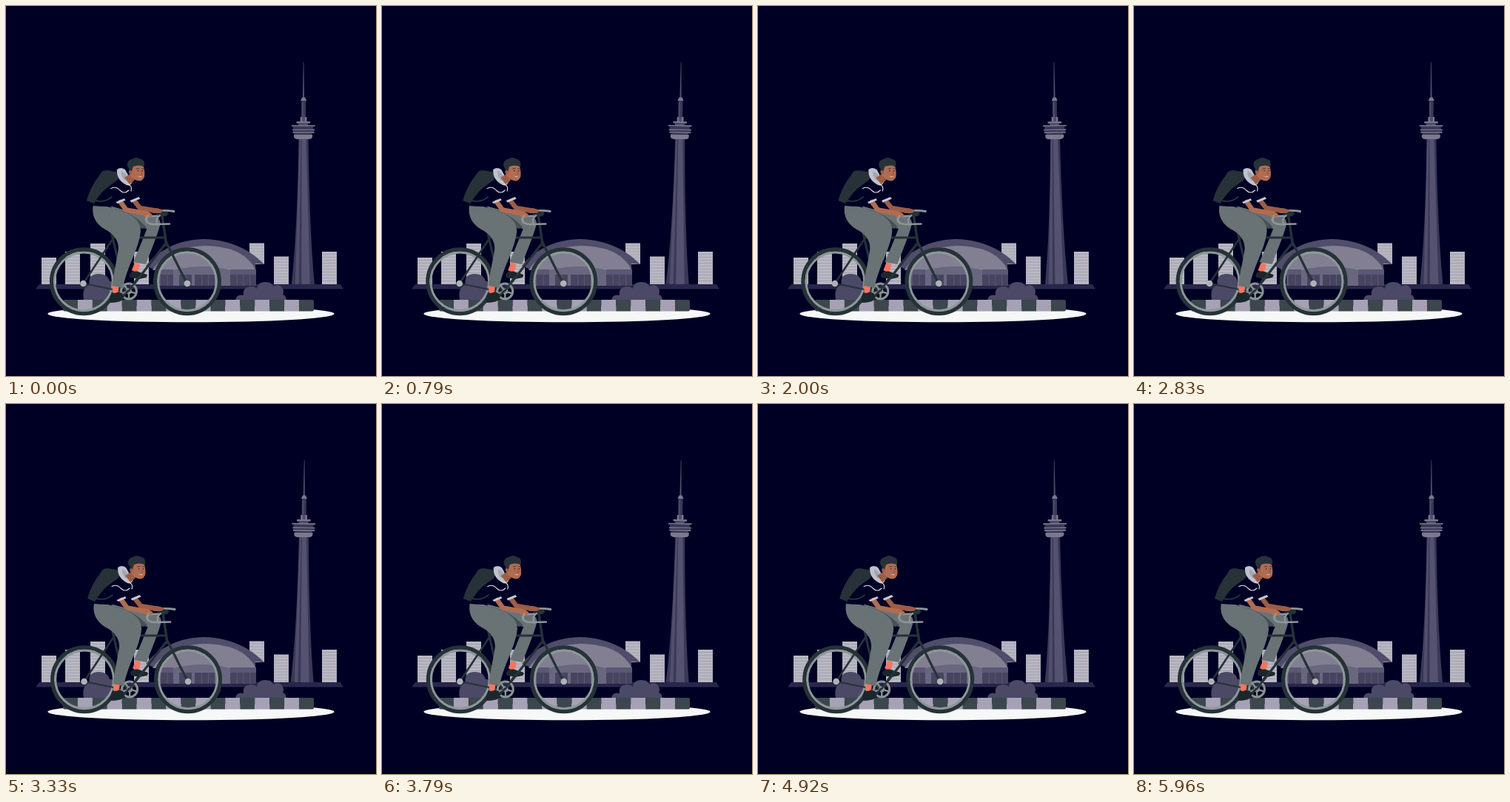
Write an HTML page with a canvas that moves like this. It is 500 by 500 pixels and loops after 6 s.

```html
<!DOCTYPE html>
<html>
<head>
<meta charset="utf-8">
<style>
html, body { margin: 0; width: 100%; height: 100%; overflow: hidden; background: #000025; }
canvas { display: block; width: 500px; height: 500px; }
</style>
</head>
<body>
<canvas id="stage" width="500" height="500"></canvas>
<script>
const ctx = document.getElementById('stage').getContext('2d');
const LOOP = 6000, LEAD = 50;
const NIGHT = '#000025', DARK = '#263238', STEEL = '#8d9799', HUB = '#b0b3b5';
const SKIN = '#b06c52', SHADE = '#9d5c45', CORAL = '#f4765f', SHOE = '#1c272c', CLOTH = '#697275';

// Piecewise linear tracks: [phase, value]
const SHAKE = [[0, 0], [.1, -1], [.2, 2], [.3, -4], [.4, 4], [.5, -4], [.6, 4], [.7, -4], [.8, 2], [.9, -1], [1, 0]];
const SWAY = [[0, 0], [.25, 1], [.75, -1], [1, 0]];

function track(keys, p) {
  let i = 1;
  while (i < keys.length - 1 && keys[i][0] < p) i++;
  const [a, u] = keys[i - 1], [b, v] = keys[i];
  return u + (v - u) * (p - a) / (b - a);
}

function rect(x, y, w, h, color) {
  ctx.fillStyle = color;
  ctx.fillRect(x, y, w, h);
}
function fill(d, color) {
  ctx.fillStyle = color;
  ctx.fill(new Path2D(d));
}
function line(d, color, width, cap = 'round') {
  ctx.strokeStyle = color;
  ctx.lineWidth = width;
  ctx.lineCap = cap;
  ctx.lineJoin = 'round';
  ctx.stroke(new Path2D(d));
}
function disc(x, y, rx, color, ry = rx) {
  ctx.fillStyle = color;
  ctx.beginPath();
  ctx.ellipse(x, y, rx, ry, 0, 0, Math.PI * 2);
  ctx.fill();
}
function ring(x, y, r, color, width) {
  ctx.strokeStyle = color;
  ctx.lineWidth = width;
  ctx.beginPath();
  ctx.arc(x, y, r, 0, Math.PI * 2);
  ctx.stroke();
}

function block(x, top, bottom = 376) {
  rect(x, top, 20, bottom - top, '#b8b7c2');
  for (let y = top + 3; y < bottom - 1; y += 4) rect(x, y, 20, 1, '#a3a2af');
}

function windows(x, w, n) {
  rect(x, 363, w, 15, '#47445f');
  for (let i = 1; i < n; i++) rect(x + i * w / n, 363, 1, 15, '#5c5973');
}

function dome() {
  fill('M189 351 C205 330 235 315 268 315 C306 316 331 331 349 349 L337 348 L337 356 L200 356 Z', '#504d6b');
  fill('M198 357 C206 343 229 325 268 324 C308 325 326 336 338 357 Z', '#817f91');
  rect(206, 356, 20, 22, '#5a5774');
  rect(303, 356, 35, 22, '#5a5774');
  fill('M226 378 V357 Q266 347 303 357 V378 Z', '#69677f');
  windows(209, 17, 2);
  windows(234, 17, 2);
  windows(255, 27, 3);
  windows(303, 35, 4);
}

function tower(angle) {
  const light = '#7b798e', mid = '#504e6b', deep = '#3a3857';
  ctx.save();
  ctx.translate(402, 226);
  ctx.rotate(angle * Math.PI / 180);
  ctx.translate(-402, -226);
  fill('M395.5 179 H408.5 Q410 300 417 376 H386 Q394 300 395.5 179 Z', deep);
  fill('M399.5 179 H405.5 L411 376 H399.5 Z', '#545270');
  fill('M396.5 179 H398.5 L396 376 H391 Z', mid);
  fill('M401.5 76 H402.2 L403 125 H400.8 Z', mid);
  fill('M398 128 L400 123.5 H404 L406 128 Z', light);
  rect(399, 128, 6, 23, deep);
  rect(400, 130, 1.5, 20, mid);
  rect(397.5, 150, 9, 6, mid);
  rect(398, 150, 2, 6, light);
  rect(404, 150, 2, 6, light);
  rect(392.5, 156, 18.5, 2.5, light);
  rect(395, 158.5, 13, 2.5, mid);
  rect(386, 161, 31.5, 1.8, light);
  rect(388, 162.8, 27, 3.7, deep);
  rect(387, 166.5, 30, 1.8, light);
  rect(388, 168.3, 28, 1.7, deep);
  rect(387.5, 170, 29, 1.8, light);
  rect(390, 171.8, 23, 2, deep);
  fill('M389 173.8 H414 V177 Q413 180 409 180 H394 Q390 180 389 177 Z', light);
  ctx.restore();
}

function bushes() {
  fill('M105 397 Q102 380 113 377 Q110 363 124 362 Q137 361 140 372 Q151 371 152 382 Q160 387 158 397 Z', '#4b4966');
  fill('M310 397 Q312 389 321 391 Q319 380 331 379 Q336 379 339 382 Q340 373 350 373 Q360 373 361 379 Q369 374 374 382 Q376 386 374 390 Q378 391 379 397 Z', '#4b4966');
}

function kerb() {
  ctx.save();
  ctx.beginPath();
  ctx.roundRect(77, 397, 339, 15.5, 2);
  ctx.clip();
  for (let i = 0; i < 17; i++) rect(77 + i * 19.94, 397, 20, 16, i % 2 ? '#a6a1b4' : '#3b474c');
  ctx.restore();
}

function wheel(x) {
  ring(x, 372.3, 43.4, DARK, 5.2);
  ring(x, 372.3, 39.4, STEEL, 3);
}

function farLeg() {
  line('M166 385 L178 368', DARK, 3);
  fill('M169 360 Q175 356 181 360 L190 362.5 Q192 365 189 367 L180 369 L168 367 Q165 364 169 360 Z', SHOE);
  fill('M174 347 L181 349 L179.5 357 Q174 360 170 357 Z', CORAL);
  fill('M140 270 L162 276 L201 284 Q211 288 208 297 C204 312 196 330 189 349 L172 346 Q180 328 190.5 301 L168 296 Z', CLOTH);
  fill('M146 274 Q172 279 190 299 L184 301 L160 290 Z', '#465054');
}

function bike() {
  wheel(105);
  wheel(245);
  line('M104.5 375 L147 311', DARK, 2.6);
  line('M105 375 L164 387', DARK, 2);
  line('M143 308 L161 385', DARK, 3.2);
  line('M148 313 H214', DARK, 3);
  line('M215 322 L166 385', DARK, 3.2);
  line('M211 283 L217 323', DARK, 3.4);
  line('M216 318 L237 360 Q241 368 245 374.5', DARK, 3.2);
  disc(104.5, 375, 4.3, HUB);
  disc(245, 375, 4.3, HUB);

  ring(166, 385.5, 10.5, '#89928f', 3);
  disc(166, 385.5, 4, '#89928f');
  for (let i = 0; i < 5; i++) {
    const a = i * Math.PI * .4 + .3;
    line(`M166 385.5 l${Math.cos(a) * 10} ${Math.sin(a) * 10}`, '#89928f', 2.4);
  }
  line('M165 385 L153 398', DARK, 3);
  line('M166 385 L179 367', DARK, 2.4);

  line('M205 283 L216 282', DARK, 4);
  line('M198 278 Q212 275 227 277.5', STEEL, 2.8);
  line('M206 284 Q190 283 189 288 Q190 295 200 295 L221 294.5', STEEL, 2.6);
  line('M208 283 Q201 288 205 296', STEEL, 2.2);
}

function nearLeg() {
  fill('M144 377 L153 378 L151.5 387 Q147 390 144 387 Z', CORAL);
  fill('M143 387 Q147 389 151.5 386.5 L157 388 Q160 393 158 397 Q152 401 141 401 Q139 395 143 387 Z', SHOE);
  fill('M118 269 Q136 269 149 275 C170 280 183 291 182 305 C179 330 164 351 158 381 L143.5 378 C146 358 150 343 152 328 C152 316 146 309 136 303 C123 296 115 285 118 269 Z', CLOTH);
}

function body() {
  line('M174 264 L181 273 L205 277', SHADE, 6.4);
  fill('M199 273 Q209 273 213 276.5 L210 280 L199 280 Z', SHADE);
  fill('M148 223 Q157 230 172 240 Q180 249 181 260 L168 266 L161 262 L154 270 Q139 272 118 270 Q124 248 136 229 Z', NIGHT);
  fill('M167.5 263 L179.5 258 L181.5 260.5 L169.5 265.5 Z', '#c8cad6');

  // backpack
  fill('M127 228 Q129 222 136 222 L149 224 Q156 232 147 238 C136 245 128 252 119 267 L109 263 Q114 244 127 228 Z', DARK);
  line('M121 263 Q134 266 143 258', DARK, 1.8);

  line('M155 265 L162.5 275.5 L187 280', SKIN, 6.6);
  fill('M186 276.5 Q195 277 198 283 Q195 287 189 286.5 Q184 283 186 276.5 Z', SKIN);
  fill('M148.5 265 L160 260 L161.5 262.5 L150.5 267 Z', '#c8cad6');
}

function head() {
  fill('M150 221 Q155 217 161 221 Q165 227 166 232 L171 237 Q169 244 163 242 Q149 235 150 221 Z', '#bfc2cd');
  fill('M156 223 Q163 226 165 233 L161 236 Q155 231 156 223 Z', '#a3a6b1');
  fill('M160 232 L168 227 L174 235 L167 241 Z', SHADE);
  line('M142 246.5 Q149 243 154 249 Q160 255 166 249', '#e5e6ed', 1.1);
  line('M165 241 Q171 243 169 250', '#e5e6ed', 1.1);

  fill('M167 217 Q176 211 186 217 Q188 225 187 231 Q184 238 178 236 Q170 234 167 226 Z', SKIN);
  disc(168.5, 224, 2.4, SHADE, 3);
  fill('M164 216 Q163 209 170 207 Q176 203 182 207 Q188 207 187 217 Q179 214 172 217 L170 223 L167 222 Z', DARK);
  disc(178.5, 222.8, .8, '#2b2023');
  disc(184.5, 222.8, .8, '#2b2023');
  line('M176.5 220 L180 219.4 M183.5 219.7 L186 220', DARK, .8);
  line('M182.5 223 L184 227 L181.5 227.3', '#8d4d3b', .7);
  fill('M177.5 229.5 Q181 231 184 230 Q182 232.5 177.5 229.5 Z', '#f2eeee');
}

function draw(t) {
  const time = (t + LEAD) % LOOP;
  rect(0, 0, 500, 500, NIGHT);

  const town = [[48, 340], [80, 332], [114, 321], [173, 332], [329, 320.5, 349], [362, 338.5], [427, 332]];
  town.forEach(b => block(...b));
  fill('M45 376 H452 L456 382.5 H40 Z', '#28264a');
  tower(track(SWAY, time % 3000 / 3000));
  dome();
  bushes();
  disc(250, 416, 193.7, '#f6f7f7', 11.3);
  kerb();

  ctx.save();
  ctx.translate(track(SHAKE, time / LOOP), 0);
  farLeg();
  bike();
  nearLeg();
  body();
  head();
  line('M211 281 L217 280', DARK, 4.4);
  line('M192 283 Q189 287 190 291', STEEL, 2.4);
  ctx.restore();
}

const start = performance.now();
function tick() {
  draw((performance.now() - start) % LOOP);
  requestAnimationFrame(tick);
}
draw(0);
requestAnimationFrame(tick);
</script>
</body>
</html>
```
